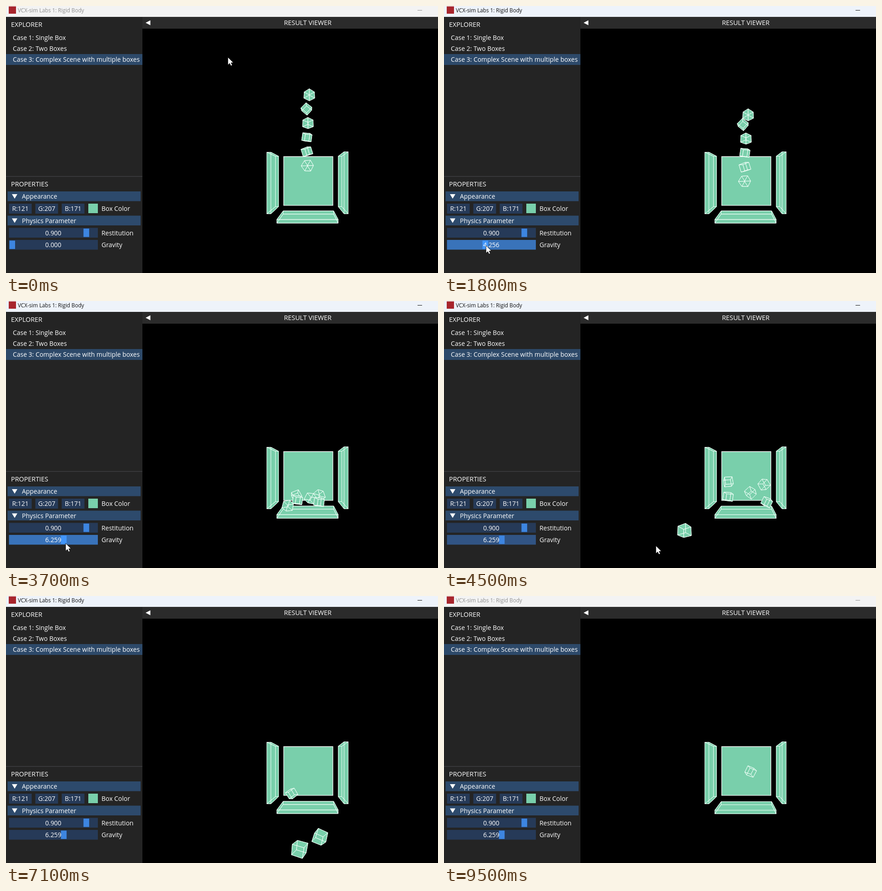
An HTML page with a canvas for the animation above (9600 ms loop, 950 px wide and 589 px high).

```html
<!DOCTYPE html>
<html lang="en">
<head>
<meta charset="utf-8">
<title>Rigid Body</title>
<style>
html, body { margin: 0; width: 100%; height: 100%; overflow: hidden; background: #000; }
canvas { display: block; }
</style>
</head>
<body>
<canvas id="stage" width="950" height="589"></canvas>
<script>
const ctx = document.getElementById('stage').getContext('2d');
const LOOP = 9600, STEP = 100;
const GRAB = 1100, RELEASE = 4200, LANDING = 2700;
const FLOOR = 446, MINT = '#79cfab';
const mix = (a, b, s) => a + (b - a) * s;
const clamp = s => Math.min(1, Math.max(0, s));

// The slider eases out to its final value while it is dragged.
const PULL = 6.259, PULL_TIME = 2.1, EASE = 2.81;
const dragShare = t => clamp((t - GRAB) / 1000 / PULL_TIME);
const gravityAt = t => PULL * (1 - (1 - dragShare(t)) ** EASE);

// Gravity integrated twice, in pixels.
function fallAt(t) {
  const s = dragShare(t);
  const eased = s / (EASE + 1) - (1 - (1 - s) ** (EASE + 2)) / ((EASE + 1) * (EASE + 2));
  return 15.5 * PULL * PULL_TIME ** 2 * (s * s / 2 - eased);
}

function cursorAt(t) {
  if (t < GRAB) {
    const s = clamp((t - 100) / 600);
    return [mix(488, 10, s), mix(113, 526, s)];
  }
  if (t < RELEASE) return [10 + 19.35 * gravityAt(t), mix(526, 536, (t - GRAB) / (RELEASE - GRAB))];
  if (t < 8500) {
    const s = (t - RELEASE) / 300;
    return [131 + 335 * s, 536 + 4 * s ** 4];
  }
  const s = clamp((t - 8500) / 400);
  return [960 - 25 * Math.sin(Math.PI * s), mix(110, 65, s)];
}

// Top to bottom: start, drift, pose, roll rate, and places at STOPS after landing.
const STOPS = [4500, 5800, 7100, 9500];
const cubes = [
  { x: 667, drift: 1, pose: [0.6, 0.79, 0], roll: -0.29, stops: [[704, 405], [683, 374], [646, 558]] },
  { x: 661, drift: -2, pose: [0.25, 0.3, 0.75], roll: 0.42, stops: [[625, 399], [626, 451], [628, 436], [674, 387]] },
  { x: 664, drift: 0, pose: [0.45, 0.8, 0], roll: 0.45, stops: [[674, 423], [702, 438], [690, 532]] },
  { x: 662, drift: 0, pose: [0.1, 0.35, 0.14], roll: 0, stops: [[625, 432], [561, 497]] },
  { x: 662, drift: 0, pose: [0.1, 0.5, -0.3], roll: 0.42, stops: [[710, 444], [754, 531]] },
  { x: 663, drift: -1, pose: [0.6, 0.8, 0.5], roll: -0.28, stops: [[529, 507]] }
];

function columnPlace({ x, drift }, row, t) {
  const speed = row ? 15.5 : 21;
  const y = 196.3 + 31.2 * row + speed * t / 1000 + fallAt(t);
  return [x + drift * t / 1000, Math.min(FLOOR, y)];
}

function cubePlace(cube, row, t) {
  if (t <= LANDING) return columnPlace(cube, row, t);
  const { stops } = cube;
  const leg = Math.min(stops.length - 1, STOPS.findIndex(end => t <= end) >>> 0);
  const start = leg ? STOPS[leg - 1] : LANDING;
  const [x0, y0] = leg ? stops[leg - 1] : columnPlace(cube, row, LANDING);
  const [x1, y1] = stops[leg];
  const s = (t - start) / (STOPS[leg] - start);
  const after = (t - STOPS[leg]) / 1000;

  // A cube that leaves the tray speeds up and drops out of view.
  if (y1 > FLOOR + 20) {
    const x = mix(x0, x1, s * s);
    return [x, after > 0 ? y1 + 180 * after + 62 * after ** 2 : mix(y0, y1, s ** 4)];
  }
  // Otherwise it falls, hits the floor halfway and bounces up.
  const u = 1 - Math.abs(2 * s - 1), y = mix(y0, y1, s);
  return [mix(x0, x1, s), y + Math.max(0, FLOOR - y) * u * u];
}

const FACES = [[0, 1, 3, 2], [4, 5, 7, 6], [0, 1, 5, 4], [2, 3, 7, 6], [0, 2, 6, 4], [1, 3, 7, 5]];

function drawBox(points) {
  const edges = new Path2D();
  ctx.fillStyle = MINT;
  for (const face of FACES) {
    const side = new Path2D();
    face.forEach((n, i) => side[i ? 'lineTo' : 'moveTo'](...points[n]));
    side.closePath();
    ctx.fill(side);
    edges.addPath(side);
  }
  ctx.strokeStyle = '#f0fff8';
  ctx.lineWidth = 0.9;
  ctx.lineJoin = 'round';
  ctx.stroke(edges);
}

// Two rectangles given as [left, top, right, bottom].
function drawSlab(front, back, dy = 0.5) {
  const corners = ([l, t, r, b]) =>
    [[l, t], [r, t], [l, b], [r, b]].map(([x, y]) => [x + 0.5, y + dy]);
  drawBox([...corners(front), ...corners(back)]);
}

const turn = (u, v, angle) => {
  const c = Math.cos(angle), s = Math.sin(angle);
  return [u * c - v * s, u * s + v * c];
};

function drawCube(cube, row, t) {
  const [cx, cy] = cubePlace(cube, row, t);
  const half = 8.2 + 0.045 * Math.max(0, cy - 455);
  if (cy > 589 + 2 * half) return;

  // After landing the cubes roll and settle towards a flatter view.
  const rolling = Math.max(0, t - LANDING) / 1000;
  const settle = 1 - Math.exp(-rolling / 3);
  const [rx0, ry0, rz0] = cube.pose;
  const rx = mix(rx0, 0.2, settle), ry = mix(ry0, 0.45, settle), rz = rz0 + cube.roll * rolling;

  const points = [];
  for (let i = 0; i < 8; i++) {
    let x = i & 1 ? half : -half, y = i & 2 ? half : -half, z = i & 4 ? half : -half;
    [x, z] = turn(x, z, ry);
    [y, z] = turn(y, z, rx);
    [x, y] = turn(x, y, rz);
    const depth = 1 + z / 160;
    points.push([cx + x * depth, cy + y * depth]);
  }
  drawBox(points);
}

function rect(x, y, w, h, color) {
  ctx.fillStyle = color;
  ctx.fillRect(x, y, w, h);
}

function text(str, x, y, size = 13.93, align = 'left', color = '#fff') {
  ctx.font = `${size}px "Open Sans", "Noto Sans", sans-serif`;
  ctx.textAlign = align;
  ctx.fillStyle = color;
  ctx.fillText(str, x, y);
}

function polygon(points, color, outline) {
  ctx.beginPath();
  points.forEach(p => ctx.lineTo(...p));
  ctx.closePath();
  ctx.fillStyle = color;
  ctx.fill();
  if (outline) {
    ctx.strokeStyle = outline;
    ctx.lineWidth = 0.8;
    ctx.stroke();
  }
}

function drawScene(t) {
  rect(300, 24, 650, 565, '#000');
  drawSlab([573, 322, 582, 458], [592, 331, 599, 442]);
  drawSlab([743, 321, 752, 458], [730, 331, 738, 442]);
  drawSlab([595, 471, 730, 479], [609, 452, 720, 459], 1.5 * clamp((t - LANDING) / 6800));
  rect(610, 331.5, 109.5, 109, '#fff');
  rect(611.2, 333, 107, 106.3, MINT);
  cubes.forEach((cube, row) => drawCube(cube, row, t));
  rect(300, 24, 650, 26, '#2b2b2b');
  polygon([[307, 37], [317.5, 31.5], [317.5, 42.5]], '#fff');
  text('RESULT VIEWER', 663.5, 42, 14.35, 'center');
}

function drawPanel(t, [mx, my]) {
  const over = (x, y, w, h) => mx >= x && mx < x + w && my >= y && my < y + h;
  const frame = (x, y, w, h, active, held) =>
    rect(x, y, w, h, active ? '#3973ba' : held || over(x, y, w, h) ? '#315484' : '#263a58');

  rect(0, 24, 300, 565, '#242424');
  text('EXPLORER', 11, 46, 14.35);
  rect(0, 106, 300, 24, '#2d4969');
  ['Case 1: Single Box', 'Case 2: Two Boxes', 'Case 3: Complex Scene with multiple boxes']
    .forEach((label, i) => text(label, 15, 75 + 24 * i));
  rect(0, 375.5, 300, 1, '#4c4c50');
  text('PROPERTIES', 11, 397.5, 14.35);

  const header = (label, y) => {
    rect(3.5, y, 292.5, 21.5, over(3.5, y, 292.5, 21.5) ? '#3c7fce' : '#2d4a6c');
    polygon([[13, y + 6], [25, y + 6], [19, y + 16]], '#fff');
    text(label, 35, y + 16);
  };
  header('Appearance', 409);
  header('Physics Parameter', 462.5);

  ['R:121', 'G:207', 'B:171'].forEach((label, i) => {
    const x = 6.5 + 58 * i;
    frame(x, 436, 50, 22);
    text(label, x + 25, 452, 13.93, 'center');
  });
  rect(181, 436, 21, 21, MINT);
  text('Box Color', 210, 452);

  const slider = (label, y, value, share, active, held) => {
    frame(6.5, y, 195.5, 21.5, active, held);
    rect(7.5 + 181 * share, y + 1.5, 12.5, 18.5, active ? '#4296fa' : '#3d85e0');
    text(value.toFixed(3), 104, y + 16, 13.93, 'center');
    text(label, 210, y + 16);
  };
  const gravity = gravityAt(t), active = t >= GRAB && t < RELEASE + 100;
  slider('Restitution', 489.5, 0.9, 0.9);
  slider('Gravity', 516, gravity, gravity / 10, active, t >= RELEASE && t < RELEASE + 400);
}

function drawTitleBar(focused) {
  const ink = focused ? '#111' : '#8f8f8f';
  rect(0, 0, 950, 24, focused ? '#eef3fa' : '#f3f3f3');
  rect(6, 1, 16, 16, '#a8252c');
  text('VCX-sim Labs 1: Rigid Body', 26, 13.5, 11.7, 'left', ink);
  rect(905, 9, 10, 1, ink);
}

function draw(t) {
  const cursor = cursorAt(t);
  drawScene(t);
  drawPanel(t, cursor);
  drawTitleBar(t >= GRAB + 100 && t < 9300);
  polygon([[0, 0], [0, 17], [4, 13.5], [6.5, 19], [9.5, 17.7], [7, 12.2], [12, 12]]
    .map(([x, y]) => [cursor[0] + x, cursor[1] + y]), '#fff', '#000');
}

function tick() {
  draw(Math.floor(performance.now() % LOOP / STEP) * STEP);
  requestAnimationFrame(tick);
}
tick();
</script>
</body>
</html>
```
